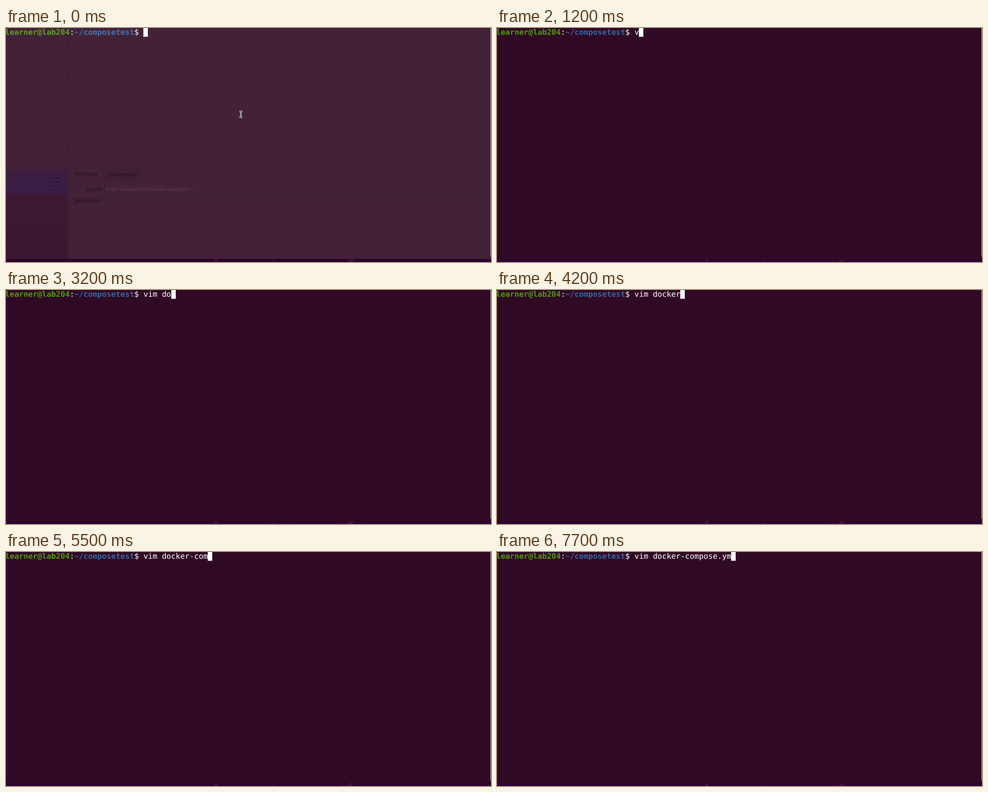
Recreate the animation shown at these times as an HTML page. Size 1077x520 px, loop 8000 ms.

```html
<!DOCTYPE html>
<html lang="en">
<head>
<meta charset="utf-8">
<title>Terminal</title>
<style>
  html, body { margin: 0; width: 100%; height: 100%; overflow: hidden; background: #300a24; }
  svg { display: block; }
  text { white-space: pre; text-rendering: geometricPrecision; }
  .shell { font: 17px "DejaVu Sans Mono", monospace; fill: #fff; }
  .bold { font-weight: bold; }
  .user { fill: #4e9a06; }
  .path { fill: #3465a4; }
  .ghosted .user { fill: #60a11b; }
  .ghosted .path { fill: #4474ae; }
  #ghost { font: 11.2px "Noto Sans", sans-serif; }
  #ghost text { fill: #23101e; }
  #ghost .hint { fill: #5a3b50; }
  #ghost tspan { text-decoration: underline; }
  .line { fill: none; stroke: #391b2f; }
</style>
</head>
<body>
<svg id="stage" width="1077" height="520" viewBox="0 0 1077 520">
  <defs>
    <linearGradient id="selected" x2="0" y2="1">
      <stop stop-color="#3c1d3d"/><stop offset="1" stop-color="#3a1d48"/>
    </linearGradient>
    <linearGradient id="lower" x2="0" y2="1">
      <stop stop-color="#3d1a31"/><stop offset="1" stop-color="#3a172e"/>
    </linearGradient>
  </defs>
  <rect width="1077" height="520" fill="#300a24"/>

  <!-- Window fading out behind the terminal -->
  <g id="ghost">
    <rect width="1077" height="514" fill="#432238"/>
    <rect y="315" width="138" height="54" fill="url(#selected)"/>
    <rect y="369" width="138" height="145" fill="url(#lower)"/>
    <path class="line" d="M0 40.5H138M0 95.5H138M0 150.5H138M0 205.5H138M0 260.5H138M137.5 0V514M140.5 0V514M141 307.5H1077"/>
    <rect x="216" y="314" width="84" height="22" fill="#3f2035"/>
    <path class="line" d="M141 311.5H215.5V336.5H1077M215.5 313.5H300.5V336M1077 346.5H219.5V368.5H1077M1077 375.5H219.5V514"/>
    <path d="M104 333.5H118M104 342.5H118M104 351.5H118M97 333.5h4M97 342.5h4M97 351.5h4" stroke="#271329" stroke-width="1.5"/>
    <text x="151" y="328"><tspan>A</tspan>ttributes</text>
    <text x="226" y="329"><tspan>I</tspan>nformation</text>
    <text x="214" y="362" text-anchor="end"><tspan>N</tspan>ame:</text>
    <text x="214" y="387" text-anchor="end"><tspan>D</tspan>escription:</text>
    <text class="hint" x="222" y="362">Enter a name for the new snapshot...</text>
  </g>

  <!-- Desktop edge -->
  <rect y="513" width="1077" height="1" fill="#2a0a22"/>
  <rect y="514" width="1077" height="6" fill="#2d0032"/>
  <path d="M462 514h8l-1 6h-6zM593 514h2l-2 6h-2zM744 514h2l5 6h-2zM764 514h10l-7 6h-10z" fill="#4d0b3f"/>
  <rect x="1076" width="1" height="508" fill="#d8d0d5"/>

  <text class="shell" x="-1.9" y="15"><tspan class="bold user">learner@lab204</tspan>:<tspan class="bold path">~/composetest</tspan>$ <tspan id="typed"></tspan></text>
  <rect id="caret" width="10" height="19.5" fill="#fff"/>
  <g id="pointer" fill="none">
    <path d="M518.5 185.5h6M521.5 185.5v13M518.5 198.5h6" stroke="#fff" stroke-width="3"/>
    <path d="M519 185.5h5M521.5 185.5v13M519 198.5h5" stroke="#111"/>
  </g>
</svg>
<script>
const LOOP = 8000, CELL = 10.234, PROMPT_END = 305.1;
const command = "vim docker-compose.ym";
const keyTimes = [1200, 1400, 1600, 1800, 3100, 3200, 3600, 3800, 3900, 4200, 5000,
                  5200, 5300, 5500, 5700, 5900, 6000, 6200, 6300, 7200, 7700];
const caretOff = [[2300, 3100], [4800, 4900], [7000, 7200]];

const [stage, ghost, typed, caret, pointer] =
  ["stage", "ghost", "typed", "caret", "pointer"].map(id => document.getElementById(id));
const show = (node, on) => node.setAttribute("visibility", on ? "visible" : "hidden");

function draw(t) {
  const count = keyTimes.filter(key => key <= t).length;
  typed.textContent = command.slice(0, count);
  caret.setAttribute("x", Math.round(PROMPT_END + count * CELL));
  show(caret, !caretOff.some(([from, to]) => t >= from && t < to));
  show(ghost, t < 100);
  stage.classList.toggle("ghosted", t < 100);
  show(pointer, t < 1200);
}

const start = performance.now();
function tick() {
  draw((performance.now() - start) % LOOP);
  requestAnimationFrame(tick);
}
tick();
</script>
</body>
</html>
```
